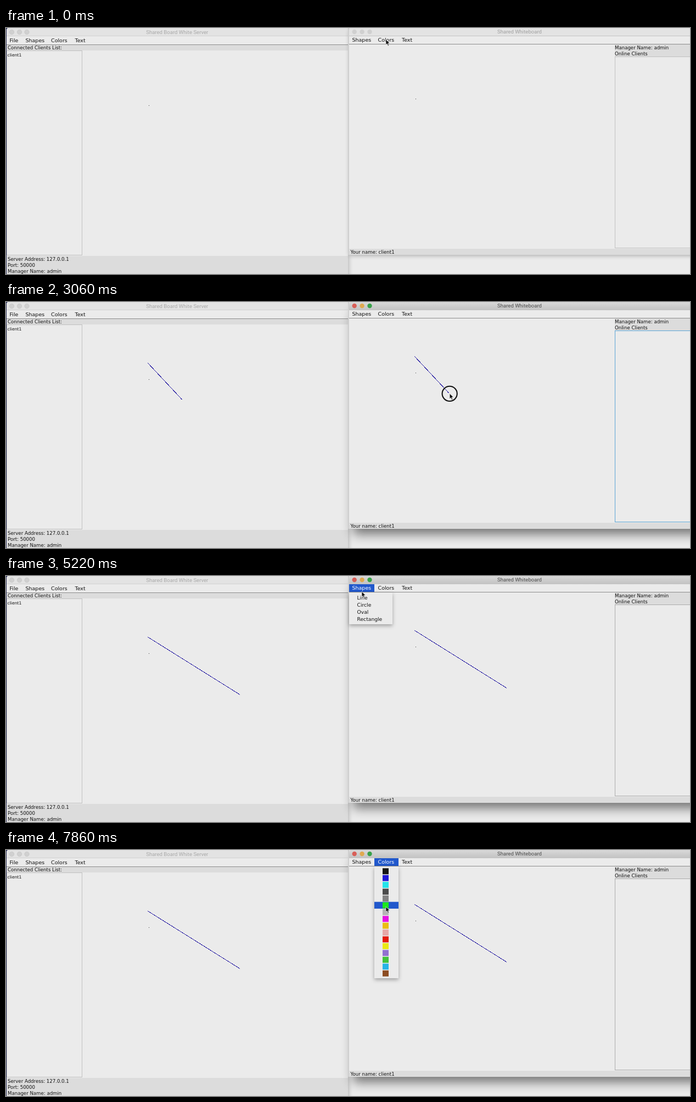
Animation, 1246 px wide and 449 px high, one loop 8000 ms. Source, as an HTML page:

```html
<!DOCTYPE html>
<html lang="en">
<head>
<meta charset="utf-8">
<title>Shared whiteboard</title>
<style>
  html, body { margin: 0; width: 100%; height: 100%; overflow: hidden; background: #ebebeb; }
  svg { display: block; width: 1246px; height: 449px; }
  text { font: 8.6px "DejaVu Sans", sans-serif; fill: #111; white-space: pre; }
  .menu { font-size: 9.5px; }
  .item { font-size: 9.2px; }
  .small { font-size: 7.7px; }
  .title { font: 9.55px Roboto, sans-serif; text-anchor: middle; fill: #a9a9a9; }
  .on { fill: #fff; }
  .crisp { shape-rendering: crispEdges; }
</style>
</head>
<body>
<svg viewBox="0 0 1246 449">
  <defs>
    <linearGradient id="bar" x2="0" y2="1">
      <stop stop-color="#d9d9d9"/><stop offset="1" stop-color="#c3c3c3"/>
    </linearGradient>
    <filter id="soft" x="-20%" y="-20%" width="140%" height="140%"><feGaussianBlur stdDeviation="4"/></filter>
    <filter id="deep" x="-20%" y="-20%" width="140%" height="140%"><feGaussianBlur stdDeviation="10"/></filter>
    <filter id="drop" x="-30%" y="-20%" width="160%" height="150%">
      <feDropShadow dx="0" dy="3" stdDeviation="3.5" flood-opacity=".32"/>
    </filter>
  </defs>
  <rect width="1246" height="449" fill="#ebebeb"/>
  <rect width="3" height="449" fill="#252a55"/>
  <rect x="1" y="3" width="623" height="460" fill="#000" opacity=".25" filter="url(#soft)"/>
  <rect width="1" height="449" fill="#252a55"/>

  <g id="server">
    <path d="M1 449V4q0-4 4-4H619q4 0 4 4V449Z" fill="#ebebeb"/>
    <path d="M1 15V4q0-4 4-4H619q4 0 4 4V15Z" fill="#e3e3e3"/>
    <g class="crisp">
      <rect x="1" y="14" width="622" height="1" fill="#d2d2d2"/>
      <rect x="1" y="30" width="622" height="1" fill="#8c8c8c"/>
      <rect x="1" y="31" width="622" height="10" fill="#dcdcdc"/>
      <rect x="1" y="416" width="622" height="33" fill="#dcdcdc"/>
      <rect x="1.5" y="41.5" width="137" height="373" fill="none" stroke="#c0c0c0"/>
    </g>
    <g fill="#d0d0d0" stroke="#c2c2c2" stroke-width=".6">
      <circle cx="10.5" cy="7.5" r="4.2"/><circle cx="24.5" cy="7.5" r="4.2"/><circle cx="38" cy="7.5" r="4.2"/>
    </g>
    <text class="title" x="311.8" y="11">Shared Board White Server</text>
    <text class="menu" x="6.5" y="26">File</text>
    <text class="menu" x="35.5" y="26">Shapes</text>
    <text class="menu" x="82" y="26">Colors</text>
    <text class="menu" x="125.5" y="26">Text</text>
    <text x="3" y="39">Connected Clients List:</text>
    <text class="small" x="2.5" y="51.5">client1</text>
    <text x="3" y="424.7">Server Address: 127.0.0.1</text>
    <text x="3" y="436">Port: 50000</text>
    <text x="3" y="447">Manager Name: admin</text>
  </g>

  <rect id="shadeOff" x="626" y="4" width="660" height="411" fill="#000" opacity=".3" filter="url(#soft)"/>
  <rect id="shadeOn" x="632" y="16" width="660" height="408" fill="#000" opacity=".5" filter="url(#deep)"/>
  <rect x="623" width="2" height="414" fill="#cfcfcf"/>

  <g id="client">
    <path d="M625 414V4q0-4 4-4H1246V414Z" fill="#ebebeb"/>
    <path id="titleBar" d="M625 14V4q0-4 4-4H1246V14Z"/>
    <g class="crisp">
      <rect x="625" y="14" width="621" height="1" fill="#c4c4c4"/>
      <rect x="625" y="29" width="621" height="1" fill="#8c8c8c"/>
      <rect x="1109" y="30" width="137" height="22" fill="#dcdcdc"/>
      <rect id="list" x="1109.5" y="52.5" width="140" height="349" fill="#ebebeb"/>
      <rect x="625" y="403" width="621" height="11" fill="#dcdcdc"/>
    </g>
    <g id="lights"></g>
    <text id="clientTitle" class="title" x="935.5" y="10.3">Shared Whiteboard</text>
    <rect id="barMark" class="crisp" y="15" height="14" fill="#2158cc"/>
    <text id="shapesText" class="menu" x="630.5" y="25.3">Shapes</text>
    <text id="colorsText" class="menu" x="677.5" y="25.3">Colors</text>
    <text class="menu" x="721" y="25.3">Text</text>
    <text x="1109" y="38.5">Manager Name: admin</text>
    <text x="1109" y="49.7">Online Clients</text>
    <text x="627.5" y="411.5">Your name: client1</text>
  </g>

  <g class="crisp" fill="#333" stroke="#2a20a4">
    <rect x="260" y="141" width="1" height="1" stroke="none"/>
    <rect x="746" y="129" width="1" height="1" stroke="none"/>
    <line id="lineA"/><line id="lineB"/>
  </g>

  <g id="shapesMenu">
    <rect x="625" y="30" width="79" height="58" fill="#ebebeb" filter="url(#drop)"/>
  </g>
  <g id="colorsMenu">
    <rect x="671" y="30" width="44" height="204" fill="#ebebeb" filter="url(#drop)"/>
  </g>

  <circle id="ring" r="13.6" fill="none" stroke="#111" stroke-width="2.1"/>
  <path id="cursor" d="M0 0V9.6L2.2 7.6 3.9 11.4 5.5 10.7 3.9 7 6.9 6.8Z" fill="#0c0c0c" stroke="#f4f4f4" stroke-width=".7"/>
</svg>
<script>
const LOOP = 8000;
const $ = id => document.getElementById(id);
const set = (el, attrs) => { for (const k in attrs) el.setAttribute(k, attrs[k]); };
const add = (parent, tag, attrs, text = '') => {
  const el = document.createElementNS('http://www.w3.org/2000/svg', tag);
  set(el, attrs);
  el.textContent = text;
  parent.append(el);
  return el;
};
const within = (t, spans) => spans.some(([a, b]) => t >= a && t < b);

// Cursor tip: time, x, y
const path = [
  [330, 692, 21], [960, 692, 22], [1730, 695, 53.5], [2240, 695, 53.5],
  [2620, 744, 99], [2700, 744, 99], [3060, 808, 167], [3450, 874, 190],
  [3800, 912, 204], [3980, 912, 204], [4180, 899, 194], [4450, 765, 98],
  [4730, 648, 24], [5160, 648, 24], [5220, 648, 28.5], [5530, 659, 51.5],
  [6150, 659, 51.5], [6680, 692, 22], [6980, 692, 22], [7860, 692, 103.5]
];
const presses = [[330, 540], [1800, 1960], [2690, 3860], [4800, 4950], [5570, 5720], [6700, 6850]];
const focused = [[2080, 4870], [5850, 6770]];
const DRAG = { from: 2700, to: 3800, x: 744, y: 99 };

function tip(t) {
  const n = path.findIndex(p => p[0] > t);
  if (n === 0) return path[0].slice(1);
  if (n < 0) return path[path.length - 1].slice(1);
  const [a, x, y] = path[n - 1], [b, u, v] = path[n];
  const k = (t - a) / (b - a);
  return [x + (u - x) * k, y + (v - y) * k];
}

const swatches = ['#151515', '#2018d8', '#24e4ea', '#4b4b4b', '#828282', '#1ce81c', '#b4b4b4', '#e612e2',
  '#eabd12', '#e6a8a8', '#e41a0c', '#eae814', '#9270d0', '#42c23c', '#26b4e6', '#8c4c22'];

const menus = [
  { el: $('shapesMenu'), label: $('shapesText'), x: 625, w: 79, barW: 46, top: 32.6, step: 13.2, count: 4,
    open: [[4870, 5760]] },
  { el: $('colorsMenu'), label: $('colorsText'), x: 671, w: 44, barW: 44, top: 32.5, step: 12.43, count: 16,
    open: [[470, 1990], [6770, LOOP]] }
];
for (const m of menus)
  m.mark = add(m.el, 'rect', { x: m.x, width: m.w, height: m.step, fill: '#2158cc' });

const items = ['Line', 'Circle', 'Oval', 'Rectangle'].map((name, i) =>
  add(menus[0].el, 'text', { class: 'item', x: 639.5, y: 42.6 + i * 13.2 }, name));
swatches.forEach((fill, i) =>
  add(menus[1].el, 'rect', { x: 686, y: 33.3 + i * 12.43, width: 11, height: 11, fill }));

const lights = ['#d85f58', '#dfa94f', '#38a149'].map((on, i) => ({
  on, el: add($('lights'), 'circle', { cx: 634.7 + i * 13.9, cy: 7, r: 4.2 })
}));

function drawMenus(t, x, y) {
  $('barMark').style.display = 'none';
  for (const m of menus) {
    const open = within(t, m.open);
    const fade = m.open.reduce((o, [, end]) => t >= end && t < end + 140 ? 1 - (t - end) / 140 : o, 0);
    m.el.style.opacity = open ? 1 : fade;
    m.label.classList.toggle('on', open);
    if (open) {
      $('barMark').style.display = '';
      set($('barMark'), { x: m.x, width: m.barW });
    }
    const row = Math.floor((y - m.top) / m.step);
    const hit = row >= 0 && row < m.count && x >= m.x && x < m.x + m.w;
    m.mark.style.display = hit ? '' : 'none';
    if (hit) set(m.mark, { y: m.top + row * m.step });
    if (m === menus[0]) items.forEach((el, i) => el.classList.toggle('on', hit && i === row));
  }
}

function drawLines(t) {
  const shown = t > DRAG.from;
  const [x, y] = tip(Math.min(t - 10, DRAG.to));
  [[$('lineA'), -486, 12], [$('lineB'), 0, 0]].forEach(([el, dx, dy]) => {
    el.style.display = shown ? '' : 'none';
    set(el, { x1: DRAG.x + dx + .5, y1: DRAG.y + dy + .5, x2: x + dx, y2: y + dy + .5 });
  });
}

function draw(t) {
  const [x, y] = tip(t);
  const active = t >= 400;
  $('shadeOn').style.display = active ? '' : 'none';
  $('shadeOff').style.display = active ? 'none' : '';
  set($('titleBar'), { fill: active ? 'url(#bar)' : '#e3e3e3' });
  $('clientTitle').style.fill = active ? '#4a4a4a' : '#a0a0a0';
  lights.forEach(l => set(l.el, { fill: active ? l.on : '#d0d0d0' }));
  set($('list'), { stroke: within(t, focused) ? '#5ba5d6' : active ? '#ababab' : '#c0c0c0' });
  drawMenus(t, x, y);
  drawLines(t);
  set($('cursor'), { transform: `translate(${x} ${y})` });
  set($('ring'), { cx: x, cy: y + .3 });
  $('ring').style.display = within(t, presses) ? '' : 'none';
}

const start = performance.now();
function tick() {
  draw((performance.now() - start) % LOOP);
  requestAnimationFrame(tick);
}
tick();
</script>
</body>
</html>
```
